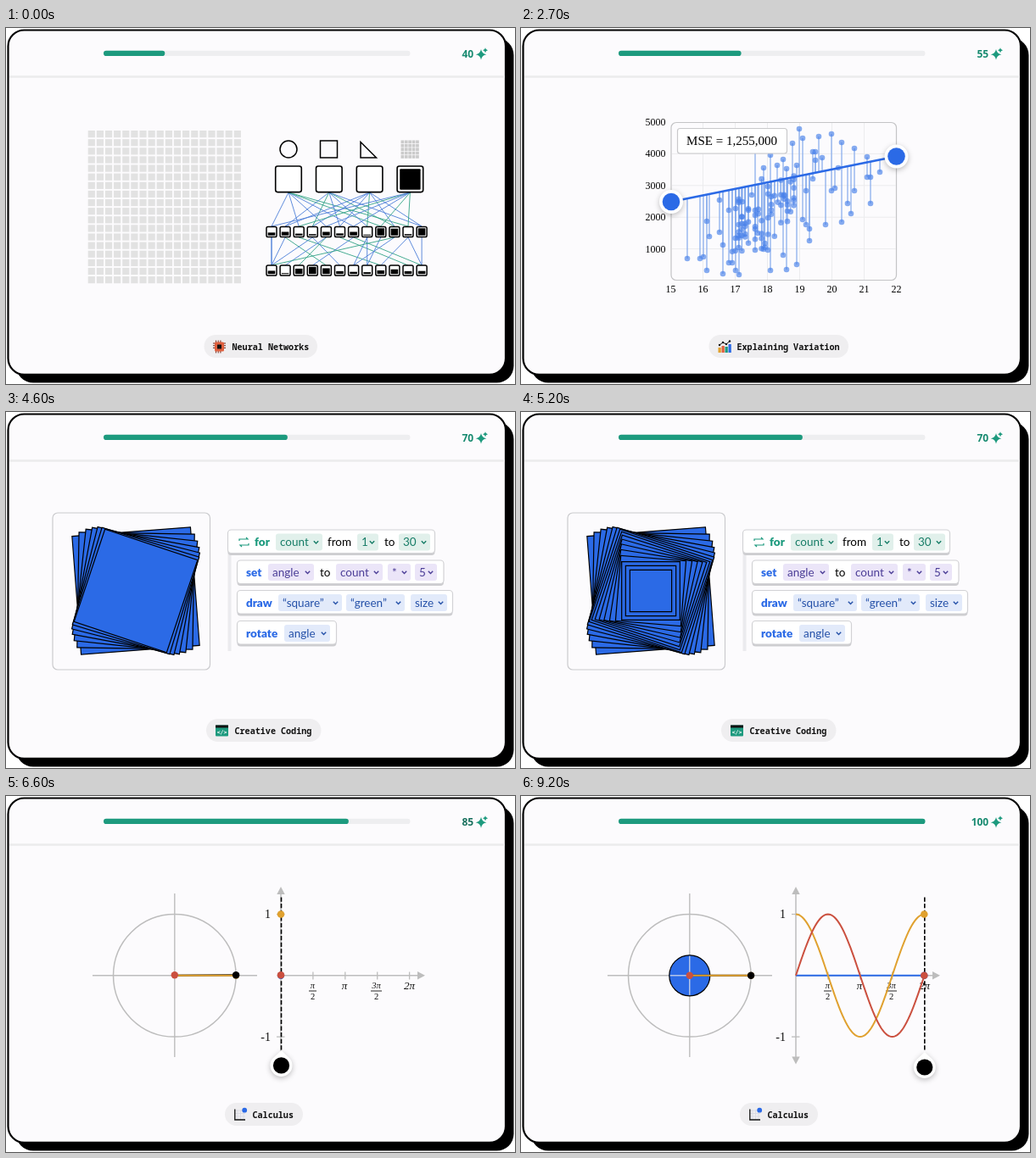
Recreate the animation shown at these times as an HTML page with a canvas. Size 600 px wide and 420 px high, loop 9.3 s.

```html
<!DOCTYPE html>
<html lang="en">
<head>
<meta charset="utf-8">
<title>Lessons</title>
<style>
html, body { margin: 0; width: 100%; height: 100%; overflow: hidden; background: #fff; }
canvas { display: block; }
</style>
</head>
<body>
<canvas id="stage" width="600" height="420"></canvas>
<script>
const ctx = document.getElementById('stage').getContext('2d');
const LOOP = 9300, TAU = Math.PI * 2;
const GREEN = '#1d9a7e', BLUE = '#2b6ae6', ORANGE = '#e0a12f', RED = '#cb503f', GREY = '#bdbdbd';
const SERIF = '"Liberation Serif", serif', SANS = 'Lato, sans-serif';

const clamp = v => Math.max(0, Math.min(1, v));
const lerp = (a, b, u) => a + (b - a) * u;
const ease = u => u < .5 ? 2 * u * u : 1 - 2 * (1 - u) ** 2;
const span = (t, a, b) => ease(clamp((t - a) / (b - a)));

function random(seed) {
  return () => {
    seed = (seed * 1664525 + 1013904223) >>> 0;
    return seed / 4294967296;
  };
}

function paint(fill, stroke, width = 1) {
  if (fill) { ctx.fillStyle = fill; ctx.fill(); }
  if (stroke) { ctx.strokeStyle = stroke; ctx.lineWidth = width; ctx.stroke(); }
}
function box(x, y, w, h, r, fill, stroke, width) {
  ctx.beginPath();
  ctx.roundRect(x, y, w, h, r);
  paint(fill, stroke, width);
}
function dot(x, y, r, fill, stroke, width) {
  ctx.beginPath();
  ctx.arc(x, y, r, 0, TAU);
  paint(fill, stroke, width);
}
function path(points, fill, stroke, width) {
  ctx.beginPath();
  points.forEach(([x, y]) => ctx.lineTo(x, y));
  if (fill) ctx.closePath();
  paint(fill, stroke, width);
}
const line = (x1, y1, x2, y2, color, width) => path([[x1, y1], [x2, y2]], null, color, width);
function text(s, x, y, font, color = '#111', align = 'left') {
  ctx.font = font;
  ctx.fillStyle = color;
  ctx.textAlign = align;
  ctx.fillText(s, x, y);
}
function shadowed(draw, blur = 6, y = 2, color = 'rgba(0,0,0,.25)') {
  ctx.save();
  ctx.shadowBlur = blur;
  ctx.shadowOffsetY = y;
  ctx.shadowColor = color;
  draw();
  ctx.restore();
}

/* Card, progress and label */

const counting = [1600, 3250, 6030, 8580];

function star(x, y, r) {
  ctx.beginPath();
  ctx.moveTo(x, y - r);
  for (let i = 1; i <= 4; i++) {
    const a = i * TAU / 4 - TAU / 4, m = a - TAU / 8;
    ctx.quadraticCurveTo(x + Math.cos(m) * r * .2, y + Math.sin(m) * r * .2, x + Math.cos(a) * r, y + Math.sin(a) * r);
  }
}

function card(t) {
  ctx.fillStyle = '#fff';
  ctx.fillRect(0, 0, 600, 420);
  box(12, 12, 586.5, 406.5, 20, '#000');
  box(2.5, 2.5, 586.5, 406.3, 19, '#fcfbfd', '#000', 2.2);
  line(4, 57.5, 588, 57.5, '#ebebec', 2.5);

  const done = counting.reduce((sum, at) => sum + span(t, at, at + 600), 0);
  const pulse = counting.reduce((p, at) => p + Math.sin(Math.PI * clamp((t - at) / 620)), 0);
  const score = Math.round(40 + 15 * done);
  box(115, 26.7, 361.5, 6.3, 3.1, '#eeeef0');
  box(115, 26.7, 361.5 * (.2 + .2 * done), 6.3, 3.1, GREEN);
  text(score, 551.2, 35, '700 12px "Open Sans", sans-serif', pulse > .05 ? '#17705d' : '#178a70', 'right');
  star(560, 31.3, 6.3 + pulse * .6);
  paint(GREEN);
  star(565, 26.3, 3 + pulse * .3);
  paint(GREEN);
}

function label(name, x, width, textX, icon) {
  box(x, 362, width, 27, 13.5, '#efeef0');
  text(name, textX, 379.5, '600 10.1px "Noto Sans Mono", monospace', '#111');
  icon();
}

/* Neural network */

const cellX = c => 96.7 + c * 10.12, cellY = r => 121 + r * 10.12;
const stroke = [];
function run(c, r, c2, r2) {
  const n = Math.max(Math.abs(c2 - c), Math.abs(r2 - r)) || 1;
  for (let i = 0; i <= n; i++) stroke.push([Math.round(lerp(c, c2, i / n)), Math.round(lerp(r, r2, i / n))]);
}
run(3, 4, 3, 15);
run(4, 15, 12, 15);
run(10, 14, 15, 14);
run(14, 13, 13, 12);
for (let r = 11; r > 2; r--) run(r + 2, r, r + 1, r);
run(4, 4, 4, 5);
run(3, 3, 3, 3);
const soft = { '4,4': .35, '4,5': .12, '3,15': .7, '10,14': .45, '12,15': .45, '11,15': .75, '13,11': .5 };

const hiddenA = [[.4, .5, .25, .18, .5, .28, .5, .12, 1, .95, .18, 1], [.4, 0, .22, 0, 0, .3, 1, .2, 1, 1, 0, 1]];
const hiddenB = [[.45, .12, .75, 1, .8, .4, .3, .25, .5, .65, .4, .42], [.45, .12, .75, 0, .45, .42, 0, 0, .5, .65, .4, 0]];
const nodeX = i => 313 + i * 16.1, classX = i => 333 + i * 47.8;

const links = [];
{
  const rnd = random(11);
  const pick = () => rnd() < .62 ? '#4d7fd9' : '#34a487';
  for (let k = 0; k < 4; k++) {
    const start = k % 2;
    for (let j = start; j < 12; j += 2) links.push([classX(k), 194, nodeX((j + (k > 1)) % 12), 234, pick()]);
  }
  for (let i = 0; i < 12; i++) {
    links.push([nodeX(i), 247, nodeX(i ? Math.floor(rnd() * 12) : 0), 280, pick()]);
    if (i % 3 < 2) links.push([nodeX(i), 247, nodeX(Math.max(0, Math.min(11, i + Math.round(rnd() * 8 - 4)))), 280, pick()]);
  }
}

function layer(levels, y, t) {
  levels[0].forEach((from, i) => {
    const x = nodeX(i), at = 250 + (i * 5 % 12) * 70;
    const level = lerp(from, levels[1][i], span(t, at, at + 350)) * 8.4;
    box(x - 6, y - 6, 12, 12, 1.8, '#fff', '#000', 1.5);
    ctx.fillStyle = '#000';
    ctx.fillRect(x - 4.3, y + 4.2 - level, 8.6, level);
  });
}

function network(t) {
  const drawn = clamp((t - 100) / 1450) * stroke.length;
  const marks = new Map(stroke.slice(0, Math.floor(drawn)).map(c => [c.join(), soft[c.join()] ?? 1]));
  for (let r = 0; r < 18; r++) for (let c = 0; c < 18; c++) {
    const ink = marks.get(c + ',' + r) || 0, v = Math.round(226 * (1 - ink));
    ctx.fillStyle = `rgb(${v},${v},${v})`;
    ctx.fillRect(cellX(c), cellY(r), 8.2, 8.2);
  }
  if (t >= 100 && t < 1850) {
    const at = Math.min(drawn, stroke.length - 1), i = Math.floor(at);
    const a = stroke[i], b = stroke[Math.min(i + 1, stroke.length - 1)];
    dot(cellX(lerp(a[0], b[0], at - i)) + 6.5, cellY(lerp(a[1], b[1], at - i)) - 2.5, 12, 'rgba(125,162,236,.55)');
  }

  dot(333, 143, 10, null, '#000', 1.5);
  box(370.5, 133, 20, 20, 0, null, '#000', 1.5);
  ctx.beginPath();
  ctx.moveTo(418, 134.5); ctx.lineTo(418, 153); ctx.lineTo(436.5, 153); ctx.closePath();
  paint(null, '#000', 1.5);
  ctx.fillStyle = '#cbcbcb';
  for (let i = 0; i < 25; i++) ctx.fillRect(465.5 + i % 5 * 4.4, 132.5 + Math.floor(i / 5) * 4.4, 3.7, 3.7);

  links.forEach(l => line(...l, .9));
  const turn = span(t, 750, 1150), out = [0, 0, turn, 1 - turn];
  out.forEach((level, k) => {
    box(classX(k) - 15.3, 163, 30.6, 30.6, 2.5, '#fff', '#000', 1.6);
    if (level) box(classX(k) - 12.2, 190.7 - 24.4 * level, 24.4, 24.4 * level, 1, '#000');
  });
  layer(hiddenA, 240.5, t);
  layer(hiddenB, 286, t);

  label('Neural Networks', 233.5, 133.5, 266.5, () => {
    for (let i = -4; i <= 4; i += 2.7) {
      line(251.5 + i, 368.5, 251.5 + i, 383.5, '#7c3a2d', 1.1);
      line(244, 376 + i, 259, 376 + i, '#7c3a2d', 1.1);
    }
    box(246, 370.5, 11, 11, 1.5, '#e0603f');
    box(249, 373.5, 5, 5, .5, '#111');
  });
}

/* Regression */

const columns = {
  196: [272], 211: [272], 215: [270], 219: [228, 286], 222: [246], 234: [203, 241], 238: [256, 290],
  245: [215, 277], 249: [277], 253: [213, 286], 257: [291], 261: [205], 272: [197], 276: [140, 262], 279: [242],
  286: [165, 261], 291: [187, 262], 294: [150, 286], 302: [162], 309: [155, 268], 313: [166, 285], 320: [136],
  325: [162, 279], 328: [119], 332: [130, 226], 336: [192, 232], 340: [237, 251], 344: [146, 178], 347: [146, 156],
  351: [128], 355: [153], 359: [232], 366: [125, 192], 370: [189], 374: [165], 378: [135, 229], 385: [207],
  389: [219], 393: [142, 192], 408: [152, 176], 412: [176, 207], 423: [170]
};
const samples = Object.entries(columns).flatMap(([x, ys]) => ys.map(y => [+x, y]));
const fitY = (x, left, right) => left + (right - left) * (x - 177) / 265.5;
{
  // Two dense groups of columns, around 17.2 and 18.5
  const rnd = random(7);
  const scatter = (count, x0, steps, spread) => {
    for (let i = 0; i < count; i++) {
      const x = x0 + 3.8 * Math.floor(rnd() * steps);
      samples.push([x, fitY(x, 281, 140) + (rnd() + rnd() - 1) * spread]);
    }
  };
  scatter(25, 249, 6, 42);
  scatter(43, 276, 13, 48);
}
const meanError = (left, right) =>
  samples.reduce((sum, [x, y]) => sum + ((y - fitY(x, left, right)) * 26.7) ** 2, 0) / samples.length;
const bestError = meanError(281, 140);

function regression(t) {
  const right = lerp(205, 140, span(t, 2350, 2850)), left = lerp(205, 281, span(t, 2750, 3350));
  box(177, 111.5, 265.5, 186, 6, '#fcfbfd', '#c4c4c6', 1.2);
  for (let i = 0; i < 8; i++) {
    const x = 176.5 + i * 38;
    if (i && i < 7) line(x, 112, x, 297, '#ececee', 1);
    text(15 + i, x, 312, '12px ' + SERIF, '#000', 'center');
  }
  for (let i = 1; i < 6; i++) {
    const y = 298 - i * 37.4;
    if (i < 5) line(178, y, 442, y, '#ececee', 1);
    text(i * 1000, 170.5, y + 4, '12px ' + SERIF, '#000', 'right');
  }
  samples.forEach(([x, y]) => line(x, y, x, fitY(x, left, right), '#82a9ec', 1.2));
  samples.forEach(([x, y]) => dot(x, y, 3.3, 'rgba(70,127,234,.65)'));
  line(177, left, 442.5, right, BLUE, 2.6);

  box(184.5, 118.5, 129, 29.5, 3, '#fff', '#c9c9cb', 1.2);
  const mse = Math.round(248 + (meanError(left, right) - bestError) / 1000) * 1000;
  text('MSE = ' + mse.toLocaleString('en-US'), 248.5, 138, '15px ' + SERIF, '#000', 'center');
  [[177, left], [442.5, right]].forEach(([x, y]) => {
    shadowed(() => dot(x, y, 14, '#fff'));
    dot(x, y, 10.3, BLUE);
  });

  label('Explaining Variation', 221.5, 164.5, 254.5, () => {
    [ORANGE, '#e0603f', GREEN, BLUE].forEach((color, i) => {
      const h = [6, 8, 7, 10][i];
      ctx.fillStyle = color;
      ctx.fillRect(232.5 + i * 4, 383 - h, 3.3, h);
    });
    const trend = [[234, 374], [238, 371], [242, 373], [246, 369.5]];
    path(trend, null, '#111', 1);
    trend.forEach(([x, y]) => dot(x, y, 1.2, '#111'));
  });
}

/* Block program */

const themes = {
  green: ['#e1f0eb', '#167c66'], purple: ['#ebe5f8', '#4a3c96'], blue: ['#e2eafa', '#2450a8']
};
function chip(s, x, w, y, theme) {
  const [back, ink] = themes[theme];
  box(x, y - 10, w, 20, 3, back);
  text(s, x + 5, y + 4.5, '13.5px ' + SANS, ink);
  const e = x + w - 7.5;
  path([[e - 2.7, y - 1.3], [e, y + 1.4], [e + 2.7, y - 1.3]], null, ink, 1.4);
}
function block(x, y, w, keyword, keyX, color) {
  box(x, y + 1.5, w, 28.5, 4, '#cdcdd0');
  box(x, y, w, 27.5, 4, '#fff', '#d2d2d5', 1.2);
  text(keyword, keyX, y + 19, '900 13.5px ' + SANS, color);
}
const word = (s, x, y) => text(s, x, y + 4.5, '13.5px ' + SANS, '#000');

// Squares swing out and back while they shrink towards the middle
function squares(count) {
  for (let k = 0; k < count; k++) {
    const half = 70 - 1.9 * k - .005 * k ** 3, u = Math.min(1, k / 13);
    ctx.save();
    ctx.translate(153, 211);
    ctx.rotate((21 * Math.sin(Math.PI * u) - 4.4 * (1 - u)) * Math.PI / 180);
    box(-half, -half, half * 2, half * 2, 0, BLUE, '#000', 1.2);
    ctx.restore();
  }
}

function coding(t) {
  box(55, 119, 185.5, 185, 6, '#fcfbfd', '#cbcbce', 1.2);
  squares(Math.min(16, Math.floor((t - 4150) / 60)));

  ctx.fillStyle = '#ebebee';
  ctx.fillRect(261.5, 165, 4, 117);
  block(261.5, 139, 244, 'for', 293, GREEN);
  path([[275, 152], [275, 150], [285, 150], [283, 148]], null, GREEN, 1.2);
  path([[286, 155], [286, 157], [276, 157], [278, 159]], null, GREEN, 1.2);
  chip('count', 318, 55, 153.5, 'green');
  word('from', 379, 153.5);
  chip('1', 414, 25, 153.5, 'green');
  word('to', 446, 153.5);
  chip('30', 463, 37, 153.5, 'green');

  block(272.5, 175, 243.5, 'set', 283, BLUE);
  chip('angle', 309, 54, 189, 'purple');
  word('to', 370, 189);
  chip('count', 389, 55, 189, 'purple');
  chip('*', 450, 27, 189, 'purple');
  chip('5', 482, 26, 189, 'purple');

  block(272.5, 210.5, 254, 'draw', 283, BLUE);
  chip('“square”', 321, 75, 225, 'blue');
  chip('“green”', 401, 69, 225, 'blue');
  chip('size', 477, 43, 225, 'blue');

  block(272.5, 246.5, 117, 'rotate', 283, BLUE);
  chip('angle', 328, 54, 261, 'blue');

  label('Creative Coding', 236, 135.5, 269.5, () => {
    box(247, 369.5, 15, 13, 1, GREEN);
    ctx.fillStyle = '#111';
    ctx.fillRect(247, 369.5, 15, 3);
    text('</>', 254.5, 380, 'bold 6.5px "DejaVu Sans Mono", monospace', '#fff', 'center');
  });
}

/* Sine and cosine */

function fraction(top, x) {
  text(top, x, 227, 'italic 10.5px ' + SERIF, '#111', 'center');
  line(x - 2.5 - top.length * 2, 230, x + 2.5 + top.length * 2, 230, '#111', .9);
  text('2', x, 239.5, '10.5px ' + SERIF, '#111', 'center');
}

function wave(fn, u, color) {
  const points = [];
  for (let i = 0; i <= 80; i++) points.push([324 + 151.5 * u * i / 80, 211.8 - 72.3 * fn(TAU * u * i / 80)]);
  path(points, null, color, 2);
}

function calculus(t) {
  const cx = 198.8, cy = 211.8, r = 72.3;
  const u = span(t, 6550, 8530), a = u * TAU;
  const px = cx + r * Math.cos(a), py = cy - r * Math.sin(a), x = 324.3 + 151.5 * u;

  line(102, cy, 296, cy, GREY, 1.4);
  line(cx, 115, cx, 308, GREY, 1.4);
  dot(cx, cy, r, null, GREY, 1.5);
  if (u > .01) {
    ctx.beginPath();
    ctx.moveTo(cx, cy);
    ctx.arc(cx, cy, 24, 0, -a, true);
    paint(BLUE);
    ctx.beginPath();
    ctx.arc(cx, cy, 24, 0, -a, true);
    paint(null, '#000', 1.2);
  }
  if (u === 1) {
    line(cx - 23, cy, cx, cy, '#d5dbea', 1.2);
    line(cx, cy - 23, cx, cy + 23, '#d5dbea', 1.2);
  }
  path([[px, cy], [px, py], [cx, py]], null, '#c2c2c2', 1.3);
  line(cx, cy, px, py, '#000', 2);
  line(cx, cy, px, cy, ORANGE, 2);
  line(cx, cy, cx, py, RED, 2);
  dot(px, cy, 4, ORANGE);
  dot(cx, py, 4.2, RED);
  dot(px, py, 4.2, '#000');

  line(324, 113, 324, 310, GREY, 1.5);
  line(324, cy, 487, cy, GREY, 1.5);
  path([[324, 107], [319.3, 116], [328.7, 116]], GREY);
  path([[324, 316.5], [319.3, 307.5], [328.7, 307.5]], GREY);
  path([[494, cy], [485, cy - 4.7], [485, cy + 4.7]], GREY);
  for (let i = 1; i < 5; i++) line(324 + i * 37.9, 207.5, 324 + i * 37.9, 216.5, GREY, 1.3);
  [1, -1].forEach(v => {
    line(319, cy - v * r, 328.5, cy - v * r, GREY, 1.3);
    text(v, 312, cy - v * r + 4.5, '14px ' + SERIF, '#111', 'right');
  });
  fraction('π', 361.5);
  text('π', 399, 228, 'italic 13px ' + SERIF, '#111', 'center');
  fraction('3π', 436.5);
  text('2π', 475.5, 228, 'italic 13px ' + SERIF, '#111', 'center');

  line(324, cy, x, cy, BLUE, 2);
  wave(Math.cos, u, ORANGE);
  wave(Math.sin, u, RED);
  ctx.setLineDash([5.2, 2.4]);
  line(x, 119.5, x, 301, '#000', 1.6);
  ctx.setLineDash([]);
  dot(x - .5, cy, 4.2, BLUE);
  dot(x - .5, cy - r * Math.cos(a), 4.3, ORANGE);
  dot(x - .5, py, 4.3, RED);

  const press = span(t, 6500, 6720) * (1 - span(t, 8530, 8700)), y = 320 - 5 * press;
  const drop = () => {
    ctx.beginPath();
    ctx.moveTo(x, y - 18);
    ctx.quadraticCurveTo(x + 4, y - 14, x + 9, y - 9.5);
    ctx.arc(x, y, 13, -.82, Math.PI + .82);
    ctx.quadraticCurveTo(x - 4, y - 14, x, y - 18);
  };
  shadowed(() => { drop(); paint('#fff'); });
  if (press > .6) { drop(); paint('#fff', '#aac4f3', 3); }
  dot(x, y, press > .6 ? 8.2 : 9.6, '#000');

  label('Calculus', 258, 92, 290.5, () => {
    for (let i = 0; i < 3; i++) {
      line(273 + i * 3.5, 370, 273 + i * 3.5, 382, '#d7d9e2', .8);
      line(270, 371 + i * 3.5, 282, 371 + i * 3.5, '#d7d9e2', .8);
    }
    path([[269.8, 369.5], [269.8, 382], [282, 382]], null, '#111', 1.3);
    dot(281.2, 370.7, 2.9, BLUE);
  });
}

const scenes = [[6300, calculus], [4000, coding], [2200, regression], [0, network]];

function frame(now) {
  const t = now % LOOP;
  card(t);
  scenes.find(([from]) => t >= from)[1](t);
  requestAnimationFrame(frame);
}
requestAnimationFrame(frame);
</script>
</body>
</html>
```
